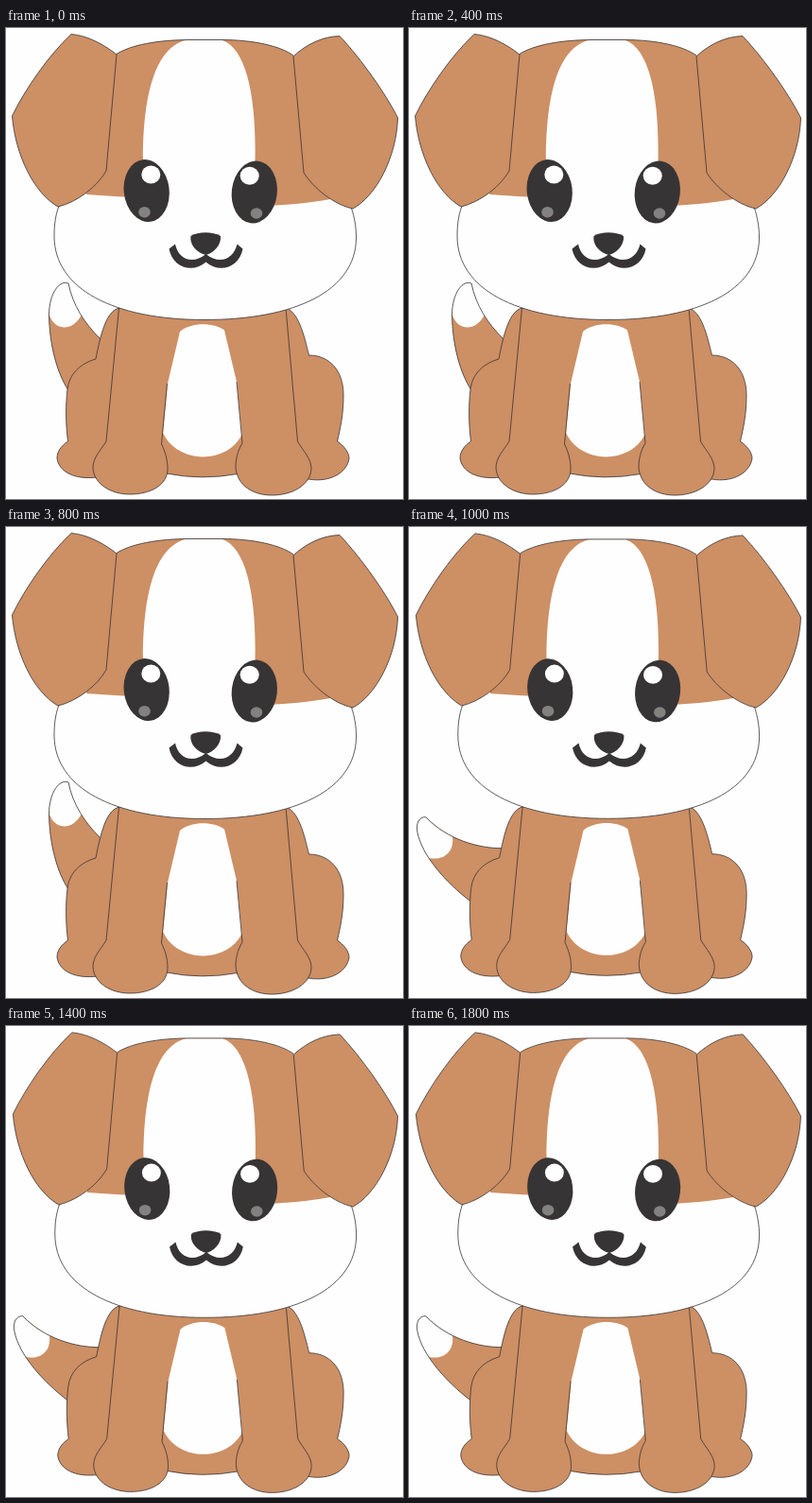
Recreate the animation shown at these times as an HTML page. Size 420 by 498 pixels, loop 2 s.

```html
<!DOCTYPE html>
<html lang="en">
<head>
<meta charset="utf-8">
<title>Puppy wagging its tail</title>
<style>
html, body { margin: 0; width: 100%; height: 100%; overflow: hidden; background: #fefefe; }
svg { display: block; width: 420px; height: 498px; }
.fur { fill: #cd8f64; }
.white { fill: #fefefe; }
.dark { fill: #373435; }
.gray { fill: #848281; }
.line { stroke: #373435; stroke-width: .8; stroke-linejoin: round; }
.open { fill: none; }
</style>
</head>
<body>
<svg viewBox="0 0 420 498">
  <defs>
    <path id="skull" d="M117 27.5C132 18 160 12.5 195 12.5H228C262 12.5 290 19 304 29L343 181L365 189C369 201 370.5 211 370.5 222C370 278 306 308.5 210 308.5C114 308.5 51 276 51 220C51 209 52 199 56 188L85 176Z"/>
    <clipPath id="headClip"><use href="#skull"/></clipPath>
  </defs>
  <g id="dog">
    <g id="tailUp">
      <path class="fur" d="M100 329C83 312 71 294 66 270C57 266 45.5 280 45.5 304C46 335 54 365 66 383L95 352Z"/>
      <path class="white" d="M80 303C74 293 69 283 66 270C57 266 45.5 280 45.5 304L47 306C53 320 71 321 80 303Z"/>
      <path class="line open" d="M100 329C83 312 71 294 66 270C57 266 45.5 280 45.5 304C46 335 54 365 66 383"/>
    </g>
    <g id="tailDown">
      <path class="fur" d="M98 340C73 340 40 331 17 307C10 306 6 314 8 323C13 348 38 376 64 396L95 352Z"/>
      <path class="white" d="M45 327C35 323 25 316 17 307C10 306 6 314 8 323C10 333 14 341 20 350C35 354 48 344 45 327Z"/>
      <path class="line open" d="M98 340C73 340 40 331 17 307C10 306 6 314 8 323C13 348 38 376 64 396"/>
    </g>

    <path class="fur line" d="M120 296C106 299 100 324 95 350C78 355 67 366 65 382C63 398 63 418 65.5 437C58 442 54 448 54 455C56 469 72 478 97 475L170 471Q207 478.5 245 471.5L320 477C343 481 361 470 363 455C363 449 358 442 350.5 437C354 422 357 408 357 388C357 362 342 346 320.5 346C315 323 309 300 296 296Z"/>
    <path class="fur" d="M106 437C100 447 92 454 92 465C93 483 112 493 131 493C152 493 171 484 171 466C171 456 168 447 164.5 440Z"/>
    <path class="fur" d="M308.5 437C314 447 323 455 323 466C322 484 302 494 281 494C262 494 244 484 243 464C243 456 245 447 250 439Z"/>
    <path class="white" d="M184 321C196 311 219 311 231 319.5L244 374L249.5 430C234 461 182 462 166 428L171 376Z"/>
    <path class="line open" d="M119.5 296L106 437C100 447 92 454 92 465C93 483 112 493 131 493C152 493 171 484 171 466C171 456 168 447 164.5 440L170.5 376M296 296L308.5 437C314 447 323 455 323 466C322 484 302 494 281 494C262 494 244 484 243 464C243 456 245 447 250 439L244 374"/>

    <use href="#skull" class="white"/>
    <g clip-path="url(#headClip)">
      <path class="fur" d="M40 0H207V13H190C158 21 145 70 145 140V178C125 180 105 177 85 176L40 176Z"/>
      <path class="fur" d="M380 0H207V13H229C254 22 265 72 263.5 140V188C295 188 320 185 343 181L380 181Z"/>
    </g>
    <path class="line open" d="M117 27.5C132 18 160 12.5 195 12.5H228C262 12.5 290 19 304 29M365 189C369 201 370.5 211 370.5 222C370 278 306 308.5 210 308.5C114 308.5 51 276 51 220C51 209 52 199 56 188"/>

    <path class="fur line" d="M69 6.5C86 8 103 17 117 28L106 151C97 167 76 184 55 189C29 174 10 134 6.5 93C20 65 45 29 69 6.5Z"/>
    <path class="fur line" d="M353 8.5C335 9 318 17 304 30L315 153C325 169 347 187 367 191C391 178 413 138 414.5 95C402 70 376 33 353 8.5Z"/>

    <g class="dark">
      <ellipse cx="148.7" cy="172" rx="24" ry="33" transform="rotate(-7 148.7 172)"/>
      <ellipse cx="262.8" cy="173.5" rx="24" ry="33" transform="rotate(7 262.8 173.5)"/>
      <path d="M195.5 220C203 215 219 215 227 220C228 230 219 238 211.5 240C203 238 194 230 195.5 220Z"/>
      <path d="M172.5 233.5L179 228.5C182 244 197 251 211.5 239C226 251 241 244 244.5 228.5L250.5 233.5C247 253 226 260 211.5 247.5C197 260 176 253 172.5 233.5Z"/>
    </g>
    <g class="white">
      <ellipse cx="153.3" cy="155" rx="10" ry="9.5"/>
      <ellipse cx="257.7" cy="156.3" rx="10" ry="9.5"/>
    </g>
    <g class="gray">
      <ellipse cx="146.5" cy="194.7" rx="6.3" ry="5.8"/>
      <ellipse cx="265" cy="196" rx="6.3" ry="5.8"/>
    </g>
  </g>
</svg>
<script>
const BEAT = 200, LOOP = 2000;
const part = id => document.getElementById(id);
const dog = part('dog'), up = part('tailUp'), down = part('tailDown');
const start = performance.now();

function draw(ms) {
  const low = Math.floor((ms % LOOP) / BEAT) % 2 === 1;
  up.style.display = low ? 'none' : '';
  down.style.display = low ? '' : 'none';
  // The lowered pose is drawn very slightly narrower.
  dog.setAttribute('transform', low ? 'matrix(.9978 0 0 .998 .9 .4)' : '');
}

function tick() {
  draw(performance.now() - start);
  requestAnimationFrame(tick);
}
draw(0);
requestAnimationFrame(tick);
</script>
</body>
</html>
```
